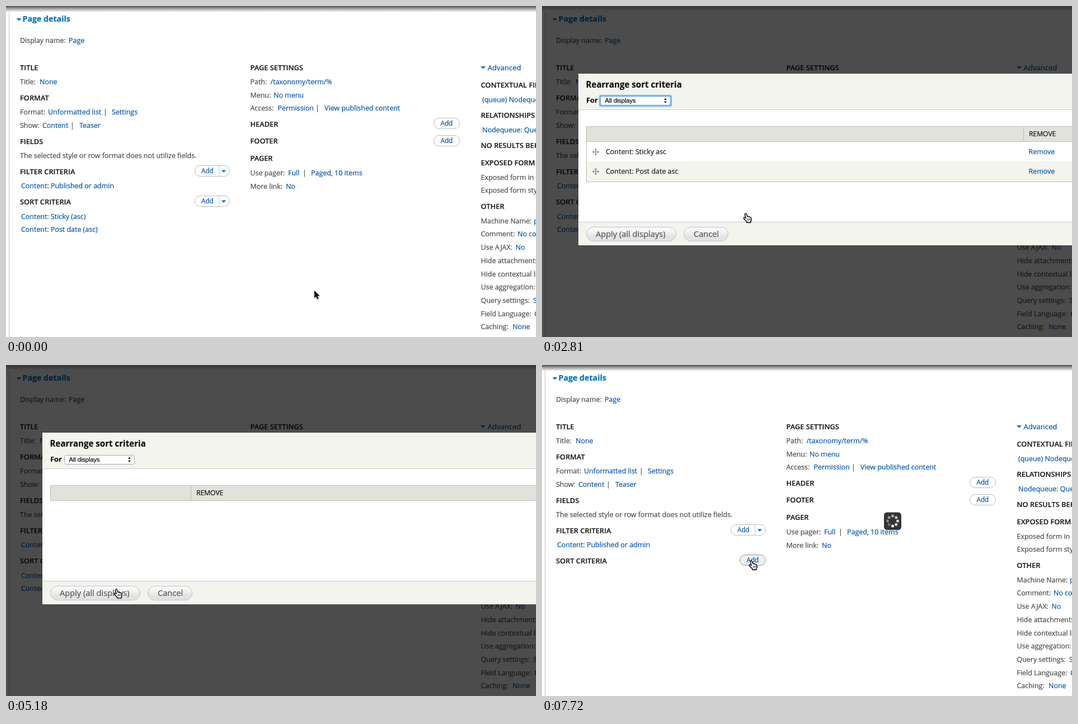
An HTML page with a canvas that plays this animation: 947 by 592 pixels, repeating every 8 s.

```html
<!DOCTYPE html>
<html lang="en">
<head>
<meta charset="utf-8">
<title>Rearrange sort criteria</title>
<style>
html, body { margin: 0; width: 100%; height: 100%; overflow: hidden; background: #fff; }
canvas { display: block; }
</style>
</head>
<body>
<canvas id="stage" width="947" height="592"></canvas>
<script>
const W = 947, H = 592, LOOP = 8000, TICK = 149;
const ctx = document.getElementById('stage').getContext('2d');

const SANS = '"Open Sans", "Noto Sans", sans-serif';
const BODY = '12.45px ' + SANS;
const HEAD = '600 12.8px ' + SANS;
const SMALL = '11.7px ' + SANS;
const BUTTON = '14.6px ' + SANS;
const LINK = '#0053a3', LABEL = '#484848', DARK = '#1c1c1c', ACCENT = '#0073ba';
const PANEL = '#f3f4ee';

// A hairline stroke gives the text a slightly heavier weight
function text(str, x, y, color = LABEL, font = BODY) {
  ctx.font = font;
  ctx.fillStyle = ctx.strokeStyle = color;
  ctx.lineWidth = .2;
  ctx.fillText(str, x, y);
  ctx.strokeText(str, x, y);
}
const link = (str, x, y) => text(str, x, y, LINK);
const head = (str, x, y) => text(str, x, y, DARK, HEAD);

function rect(x, y, w, h, color) {
  ctx.fillStyle = color;
  ctx.fillRect(x, y, w, h);
}

function poly(points, color) {
  ctx.beginPath();
  points.forEach(([x, y]) => ctx.lineTo(x, y));
  ctx.closePath();
  ctx.fillStyle = color;
  ctx.fill();
}

function box(x, y, w, h, r, fill, stroke, line = 1) {
  ctx.beginPath();
  ctx.roundRect(x, y, w, h, r);
  if (fill) { ctx.fillStyle = fill; ctx.fill(); }
  if (stroke) { ctx.strokeStyle = stroke; ctx.lineWidth = line; ctx.stroke(); }
}

function fade(y0, y1, ...colors) {
  const g = ctx.createLinearGradient(0, y0, 0, y1);
  colors.forEach((c, i) => g.addColorStop(i / (colors.length - 1), c));
  return g;
}

// Triangle centred on x, dir 1 points down, -1 points up
function caret(x, y, dir = 1, half = 4, color = ACCENT) {
  poly([[x - half, y - 2 * dir], [x + half, y - 2 * dir], [x, y + 2.5 * dir]], color);
}

function addButton(x, y, hover) {
  box(x + .5, y + .5, 46, 19, 9.5, hover ? '#f0f0f0' : '#fff', hover ? '#999' : '#bbb');
  text('Add', x + 12.5, y + 14, LINK, SMALL);
}

function splitButton(y, hover) {
  box(337.5, y + .5, 62, 19, 9.5, hover ? '#f3f3f3' : '#fff', hover ? '#999' : '#bbb');
  rect(380, y + 1, 1, 18, '#ccc');
  text('Add', 349, y + 14, LINK, SMALL);
  caret(389, y + 10.5);
}

function openMenu() {
  ctx.save();
  ctx.shadowColor = 'rgba(0,0,0,.28)';
  ctx.shadowBlur = 2;
  ctx.shadowOffsetY = 1;
  box(305.5, 339.5, 94, 46, 10, fade(339, 386, '#f9f9f9', '#fff'), '#b4b4b4');
  ctx.restore();
  rect(380, 340, 1, 45, '#d2d2d2');
  rect(306, 361, 74, 1, '#e2e2e2');
  text('Add', 317.5, 354, LINK, SMALL);
  text('Rearrange', 317.5, 376, LINK, SMALL);
  caret(389, 352, -1);
}

function drawLeft(s) {
  caret(23, 24, 1, 4.5);
  text('Page details', 29.5, 28, ACCENT, '700 14.2px ' + SANS);
  text('Display name:', 25, 66);
  link('Page', 112, 66);

  head('TITLE', 25, 115);
  text('Title:', 25, 140);
  link('None', 60, 140);

  head('FORMAT', 25, 169);
  text('Format:', 25, 194);
  link('Unformatted list', 75, 194);
  text('|', 174, 194);
  link('Settings', 189, 194);
  text('Show:', 25, 218);
  link('Content', 65, 218);
  text('|', 115, 218);
  link('Teaser', 131, 218);

  head('FIELDS', 25, 247);
  text('The selected style or row format does not utilize fields.', 25, 272);

  head('FILTER CRITERIA', 25, 301);
  link('Content: Published or admin', 27, 326);
  splitButton(285);

  head('SORT CRITERIA', 25, 355);
  if (s.cleared) {
    addButton(353, 339, s.hoverAdd);
  } else {
    link('Content: Sticky (asc)', 27, 381);
    link('Content: Post date (asc)', 27, 404);
    if (s.menu) openMenu(); else splitButton(339, s.hoverSplit);
  }
}

function drawMiddle() {
  head('PAGE SETTINGS', 436.5, 115);
  text('Path:', 436.5, 140);
  link('/taxonomy/term/%', 472.5, 140);
  text('Menu:', 436.5, 164);
  link('No menu', 478, 164);
  text('Access:', 436.5, 187);
  link('Permission', 485.5, 187);
  text('|', 553, 187);
  link('View published content', 569, 187);
  head('HEADER', 436.5, 216);
  addButton(764, 200);
  head('FOOTER', 436.5, 246);
  addButton(764, 231);
  head('PAGER', 436.5, 277);
  text('Use pager:', 436.5, 303);
  link('Full', 504, 303);
  text('|', 530, 303);
  link('Paged, 10 items', 545, 303);
  text('More link:', 436.5, 327);
  link('No', 500, 327);
}

function drawRight() {
  caret(852.5, 110, 1, 4.5);
  text('Advanced', 860.5, 115, LINK, '13.1px ' + SANS);
  head('CONTEXTUAL FILTERS', 848.5, 146);
  link('(queue) Nodequeue: Queue', 851, 172);
  head('RELATIONSHIPS', 848.5, 200);
  link('Nodequeue: Queue', 851, 226);
  head('NO RESULTS BEHAVIOR', 848.5, 254);
  head('EXPOSED FORM', 848.5, 285);
  text('Exposed form in block:', 848.5, 311);
  text('Exposed form style:', 848.5, 334);
  head('OTHER', 848.5, 363);
  text('Machine Name:', 848.5, 389);
  link('page', 943, 389);
  text('Comment:', 848.5, 412);
  link('No comment', 914, 412);
  text('Use AJAX:', 848.5, 436);
  link('No', 910.5, 436);
  text('Hide attachments in summary:', 848.5, 460);
  text('Hide contextual links:', 848.5, 484);
  text('Use aggregation:', 848.5, 507);
  text('Query settings:', 848.5, 531);
  link('Settings', 942, 531);
  text('Field Language:', 848.5, 555);
  link('Current', 944, 555);
  text('Caching:', 848.5, 578);
  link('None', 905, 578);
}

function drawPage(s) {
  rect(0, 0, W, H, '#fff');
  rect(5, 10, 1, H, '#c4c4c4');
  rect(0, 0, W, 10, fade(0, 10, '#4a4a4a', '#a8a8a8', '#ececec'));
  drawLeft(s);
  drawMiddle();
  drawRight();
}

function dragHandle(x, y) {
  const c = '#777';
  rect(x - 4, y - .5, 8, 1, c);
  rect(x - .5, y - 4, 1, 8, c);
  for (const d of [-1, 1]) {
    poly([[x + 6 * d, y], [x + 3.5 * d, y - 2.5], [x + 3.5 * d, y + 2.5]], c);
    poly([[x, y + 6 * d], [x - 2.5, y + 3.5 * d], [x + 2.5, y + 3.5 * d]], c);
  }
}

function tableRow(label, y, bg) {
  rect(79, y, W, 36, bg);
  dragHandle(96, y + 18);
  text(label, 114, y + 22, DARK);
  link('Remove', 869.5, y + 22);
}

function drawTable(rows) {
  const split = rows ? 860 : 330;
  if (rows === 2) tableRow('Content: Sticky asc', 243, '#fff');
  if (rows) {
    const y = rows === 2 ? 278 : 243;
    tableRow('Content: Post date asc', y, PANEL);
    rect(79, y + 36, W, 1, '#bebfb9');
    rect(79, 242, 1, y - 206, '#bebfb9');
  }
  box(79.5, 215.5, W, 27, 0, '#e1e2dc', '#bebfb9');
  rect(split, 216, 1, 26, '#bebfb9');
  text('REMOVE', split + 10, 233, '#111', '12.1px ' + SANS);
}

function focusRing(x, y, w, h, r) {
  box(x, y, w, h, r, null, 'rgba(90,160,240,.35)', 4);
  box(x, y, w, h, r, null, '#6aaef5', 2.2);
}

function bigButton(label, x, w, inset) {
  box(x + .5, 395.5, w - 1, 25, 12.5, fade(395, 421, '#fbfbfb', '#f4f4f4', '#e3e3e3', '#e2e2e2'), '#c3c3c3');
  text(label, x + inset, 413, '#555', BUTTON);
}

function drawSelect(focused) {
  box(104.5, 161.5, 125, 16, 3, '#fff', '#aaa');
  if (focused) focusRing(103.5, 160.5, 127, 18, 2);
  text('All displays', 112.5, 173, '#000', '11px "Liberation Sans", sans-serif');
  poly([[218, 168], [223, 168], [220.5, 164.5]], '#222');
  poly([[218, 170.5], [223, 170.5], [220.5, 174]], '#222');
}

function drawModal(s) {
  rect(0, 0, W, H, 'rgba(0,0,0,.7)');
  rect(0, 0, W, 7, fade(0, 7, '#383838', '#454545'));
  rect(0, 7, W, 3, '#4b4b4b');
  rect(65, 121, W, 307, '#fff');
  rect(65, 121, W, 64, PANEL);
  rect(65, 185, W, 1, '#ccc');
  rect(65, 386, W, 42, PANEL);
  rect(65, 386, W, 1, '#ccc');
  text('Rearrange sort criteria', 78.5, 146, '#111', '700 15.1px ' + SANS);
  text('For', 79, 173, '#111', '700 12.9px ' + SANS);
  drawSelect(s.selectFocus);
  drawTable(s.rows);
  if (s.applying) {
    bigButton('Apply', 79, 73, 17);
    focusRing(77.5, 393.5, 76, 29, 3);
    bigButton('Cancel', 166, 79, 18);
  } else {
    bigButton('Apply (all displays)', 79, 161, 17);
    bigButton('Cancel', 253, 80, 18);
  }
}

function drawSpinner(k) {
  box(611, 263.5, 31, 31.5, 5.5, '#343434');
  const lead = Math.round(((k - 41) * 3 / 11 + .25) * 8);
  for (let i = 0; i < 8; i++) {
    const age = (((lead - i) % 8) + 8) % 8, a = i * Math.PI / 4;
    ctx.beginPath();
    ctx.arc(626.5 + 9 * Math.cos(a), 279 + 9 * Math.sin(a), 2.5, 0, 7);
    ctx.fillStyle = `rgba(255,255,255,${1 - age * .1})`;
    ctx.fill();
  }
}

const ARROW = new Path2D('M0 0V13.2L3 10.4L5.3 15.6L7.6 14.6L5.4 9.6H9.6Z');
const HAND = new Path2D('M-1.6 1.2Q-1-.4 .7.2Q1.4.7 1.7 2L2.6 5.4Q4 4.6 4.9 6Q6.4 5.3 7.2 6.8' +
  'Q9 6.4 9.5 8.2L10 11.4L8.9 14V15.8H2V14.4L-.8 11.8L-3.4 9Q-4.1 7.2-2.2 7.2L.2 8.8Z');
const KNUCKLES = new Path2D('M3.1 9.4L3.5 12.6M5.2 9.2L5.5 12.4M7.2 9L7.5 12.2');

function drawCursor(x, y, hand) {
  ctx.save();
  ctx.translate(x, y);
  ctx.lineJoin = 'round';
  ctx.lineWidth = hand ? 1.2 : 1.8;
  ctx.strokeStyle = hand ? '#000' : '#fff';
  ctx.fillStyle = hand ? '#fff' : '#000';
  ctx.shadowColor = 'rgba(0,0,0,.3)';
  ctx.shadowBlur = 2;
  ctx.shadowOffsetY = 1;
  const shape = hand ? HAND : ARROW;
  ctx.stroke(shape);
  ctx.shadowColor = 'transparent';
  ctx.fill(shape);
  if (hand) {
    ctx.stroke(shape);
    ctx.lineWidth = .9;
    ctx.stroke(KNUCKLES);
  }
  ctx.restore();
}

// Pointer stops: tick, x, y
const PATH = [
  [1, 551, 509], [7, 386, 347], [10, 386, 347], [13, 364, 371], [20, 364, 371],
  [25, 874, 254], [28, 874, 254], [32, 214, 416], [33, 197, 401], [42, 197.5, 400], [46, 374, 350]
];

function pointerAt(k) {
  const i = PATH.findIndex(p => p[0] >= k);
  if (i < 0) return PATH[PATH.length - 1].slice(1);
  if (i === 0) return PATH[0].slice(1);
  const [k0, x0, y0] = PATH[i - 1], [k1, x1, y1] = PATH[i];
  const u = (k - k0) / (k1 - k0), e = u * u * (3 - 2 * u);
  return [x0 + (x1 - x0) * e, y0 + (y1 - y0) * e];
}

const within = (k, a, b) => k >= a && k < b;

function render(t) {
  const k = Math.floor((t + 32) / TICK);
  const s = {
    menu: within(k, 8, 19),
    hoverSplit: k === 7,
    modal: within(k, 19, 41),
    selectFocus: k < 26,
    rows: k < 27 ? 2 : k < 29 ? 1 : 0,
    applying: k >= 35,
    cleared: k >= 41,
    hoverAdd: k >= 46,
    spinner: within(k, 14, 19) || within(k, 36, 43) || k >= 49
  };
  const hand = within(k, 7, 21) || within(k, 25, 30) || within(k, 33, 41) || k >= 46;
  drawPage(s);
  if (s.modal) drawModal(s);
  if (s.spinner) drawSpinner(k);
  drawCursor(...pointerAt(k), hand);
}

const start = performance.now();
function loop() {
  render((performance.now() - start) % LOOP);
  requestAnimationFrame(loop);
}
loop();
</script>
</body>
</html>
```
